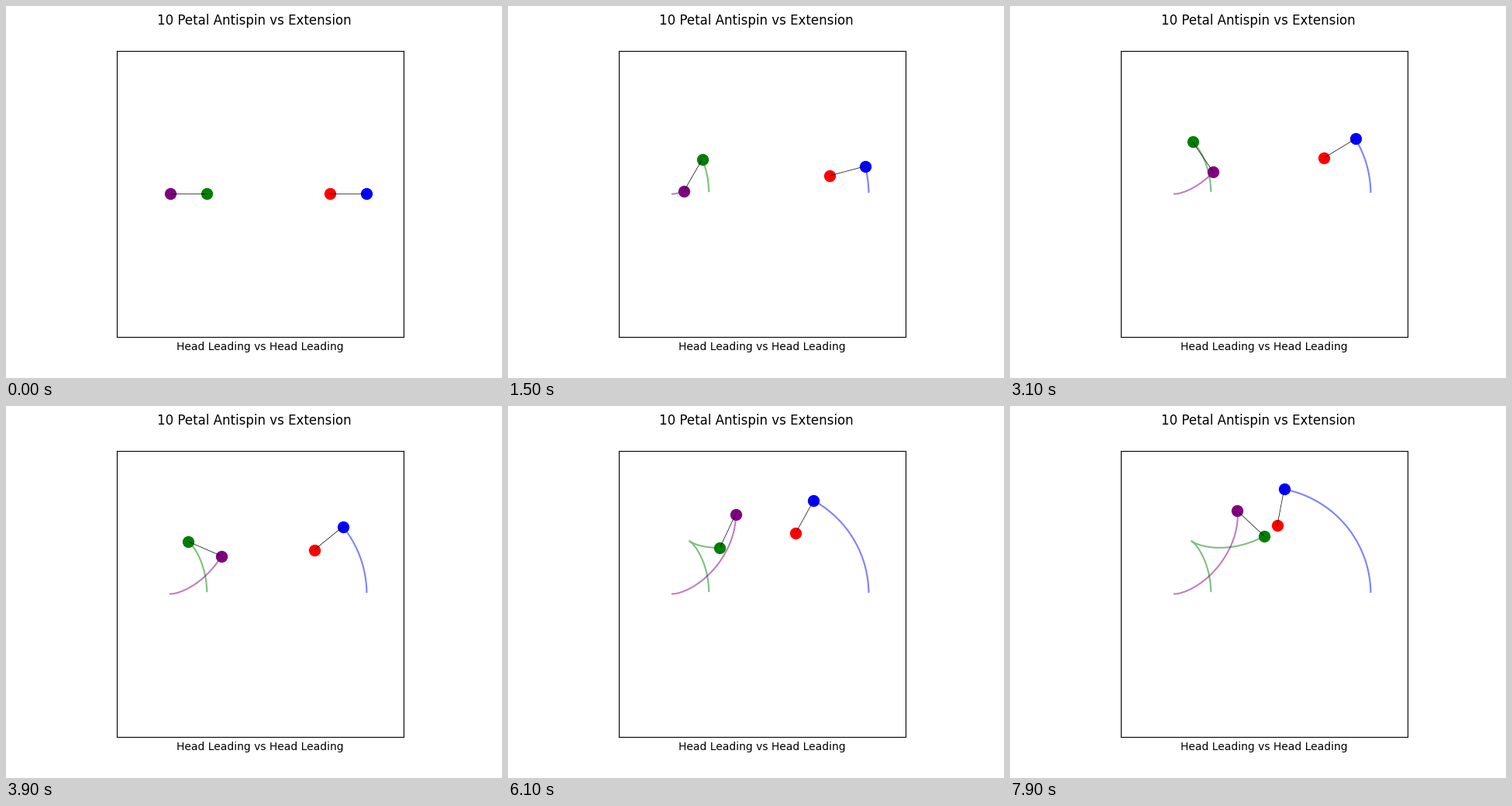
Write a matplotlib script that moves like this. It is 640 px wide and 480 px high and loops after 8 s.

```python
import numpy as np
import matplotlib.pyplot as plt
from matplotlib.animation import FuncAnimation

FRAMES, INTERVAL = 80, 100
LIMIT = 7.8
HAND_R = LIMIT / 2      # orbit of the antispin staff's centre
INNER, OUTER = 3.8, 5.8  # ends of the extension staff

theta = np.linspace(0, 2 * np.pi, 360)[:FRAMES]


def polar(r, a):
    return np.array([r * np.cos(a), r * np.sin(a)])


center = polar(HAND_R, np.pi - theta)
arm = polar(1, 4 * theta)
paths = {
    "red": polar(INNER, theta),
    "blue": polar(OUTER, theta),
    "green": center + arm,
    "purple": center - arm,
}
staffs = [("red", "blue"), ("purple", "green")]

fig, ax = plt.subplots(figsize=(6.4, 4.8), dpi=100)
ax.set_aspect("equal")
ax.set_xlim(-LIMIT, LIMIT)
ax.set_ylim(-LIMIT, LIMIT)
ax.set_xticks([])
ax.set_yticks([])
fig.suptitle("10 Petal Antispin vs Extension")
ax.set_xlabel("Head Leading vs Head Leading")

trails = {c: ax.plot([], [], color=c, lw=1.5, alpha=0.5)[0]
          for c in ("blue", "green", "purple")}
heads = {c: ax.plot([], [], "o", color=c, ms=10)[0] for c in paths}
sticks = [ax.plot([], [], color="black", lw=0.5)[0] for _ in staffs]


def update(i):
    for c, trail in trails.items():
        trail.set_data(*paths[c][:, 1:i + 1])
    for c, head in heads.items():
        head.set_data(*paths[c][:, i:i + 1])
    for stick, (a, b) in zip(sticks, staffs):
        stick.set_data(*np.column_stack([paths[a][:, i], paths[b][:, i]]))
    return [*trails.values(), *heads.values(), *sticks]


anim = FuncAnimation(fig, update, frames=FRAMES, interval=INTERVAL,
                     init_func=lambda: update(0), repeat=True, repeat_delay=0)
plt.show()
```
